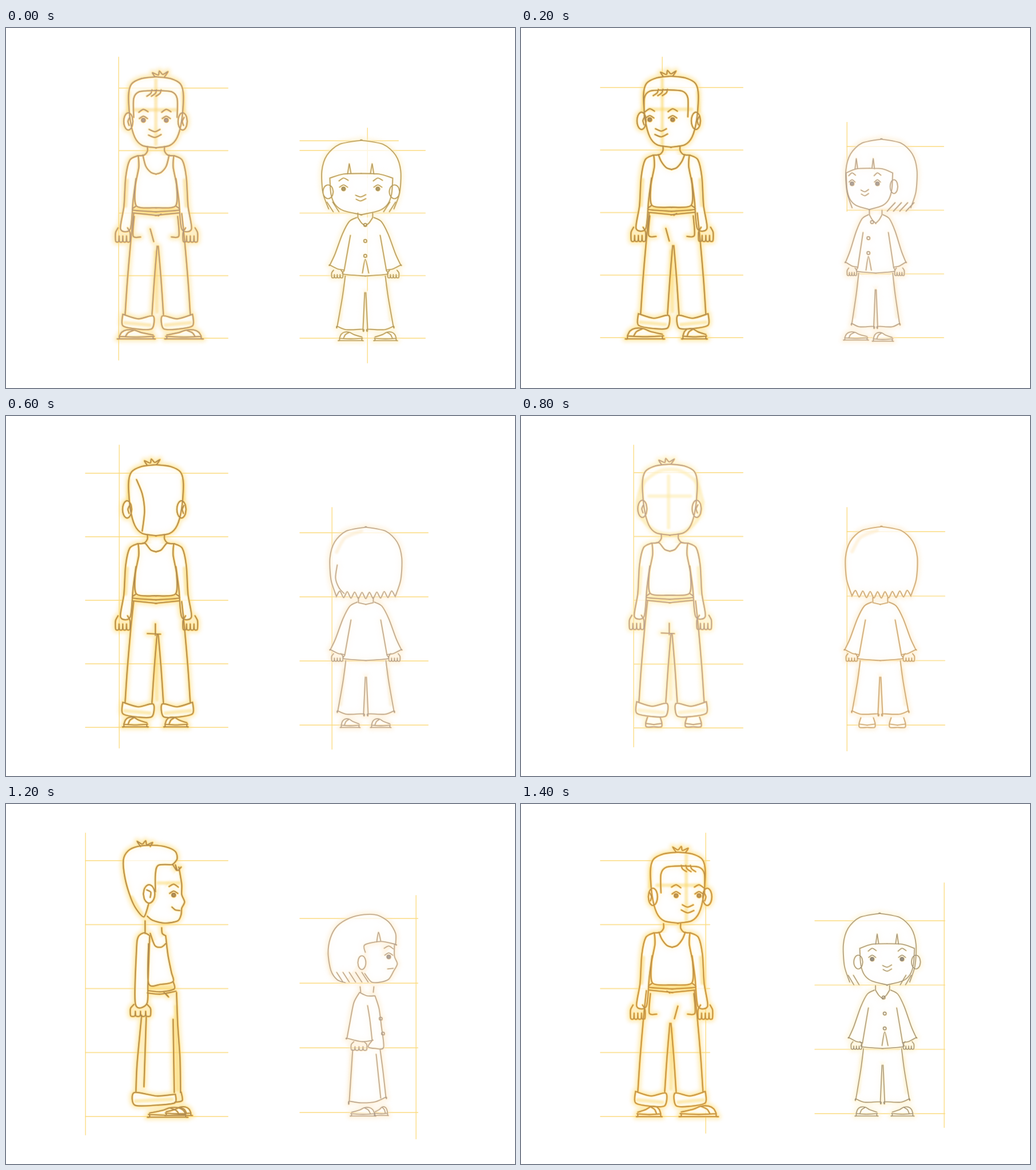
These frames come from a looping animation (890x629 px, 1.6 s). An HTML page with a canvas:

```html
<!DOCTYPE html>
<html lang="en">
<head>
<meta charset="utf-8">
<title>Character turnaround</title>
<style>
html, body { margin: 0; width: 100%; height: 100%; overflow: hidden; background: #fff; }
canvas { display: block; }
</style>
</head>
<body>
<canvas id="stage" width="890" height="629"></canvas>
<script>
const ctx = document.getElementById('stage').getContext('2d');
const STEP = 200;

let strokes = [];
let map = (x, y) => [x, y];

// Draw in a moved and scaled space; sx = -1 mirrors
function at(x, y, sx, sy, draw) {
  const outer = map;
  map = (u, v) => outer(x + u * sx, y + v * sy);
  draw();
  map = outer;
}

const points = text => text.split(' ').map(p => p.split(',').map(Number));
const mirror = pts => pts.map(([x, y]) => [-x, y]);

// Smooth path through the points; a doubled point makes a corner
function curve(p) {
  const path = new Path2D();
  path.moveTo(...p[0]);
  for (let i = 0; i < p.length - 1; i++) {
    const a = p[i - 1] || p[i], b = p[i], c = p[i + 1], d = p[i + 2] || c;
    path.bezierCurveTo(b[0] + (c[0] - a[0]) / 7, b[1] + (c[1] - a[1]) / 7,
      c[0] - (d[0] - b[0]) / 7, c[1] - (d[1] - b[1]) / 7, ...c);
  }
  return path;
}

function pen(pts, kind = 'line') {
  if (typeof pts === 'string') pts = points(pts);
  strokes.push({ kind, path: curve(pts.map(p => map(...p))) });
}
const shape = text => pen(text, 'shape');
const tone = text => pen(text, 'tone');

// One stroke continued by its mirror image
function sym(text, kind) {
  const p = points(text);
  pen([...p, ...mirror(p).reverse()], kind);
}
// A stroke and its separate mirror image
function pair(text, kind) {
  const p = points(text);
  pen(p, kind);
  pen(mirror(p), kind);
}

function oval(x, y, rx, ry) {
  const pts = [];
  for (let a = 0; a < 6.6; a += Math.PI / 5) pts.push([x + rx * Math.cos(a), y + ry * Math.sin(a)]);
  pen(pts, 'shape');
}

function dot(x, y, r, kind) {
  const path = new Path2D();
  path.arc(...map(x, y), r, 0, 7);
  strokes.push({ kind, path });
}
const button = (x, y) => dot(x, y, 2.6, 'line');

function eye(x, y) {
  dot(x, y, 3.2, 'dot');
  pen([[x - 7, y - 3], [x, y - 7], [x + 7, y - 3]]);
  pen([[x - 8, y - 14], [x, y - 19], [x + 8, y - 15]]);
}

function fist(x, y, w, h) {
  at(x, y, w, h, () => {
    pair('-.32,0 -.48,.3 -.5,.6');
    for (let u = -.5; u < .5; u += .25)
      pen([[u, .55], [u + .03, .92], [u + .22, .92], [u + .25, .55]]);
  });
}

function sandal(toe, heel, y, h) {
  at(toe, y - h, heel - toe, h, () => {
    shape('0,.72 .07,.32 .22,.08 .45,.1 .65,.35 1,.6');
    shape('0,.75 0,1 0,1 1,1 1,1 1,.75 1,.75 .5,.82 0,.75');
    pen('.18,.75 .26,.36 .44,.1');
  });
}

function heels(near, far, y) {
  for (const x of [near, far]) at(x, y, 1, 1, () => {
    sym('-11,-17 -14,-7 -13,0 0,0', 'shape');
    sym('-14,-6 0,-4');
  });
}

// Frame lines: one upright, the rest evenly spaced from y0 to y1
function rule(x, top, end, left, right, y0, y1, rows) {
  pen([[x, top], [x, end]], 'guide');
  for (let i = 0; i <= rows; i++) {
    const y = y0 + (y1 - y0) * i / rows;
    pen([[left, y], [right, y]], 'guide');
  }
}
const manRule = (x, end, left, y0, y1) => rule(x, 51, end, left, 388, y0, y1, 4);

// ---- man ----
const tuft = () => pen('-12,84 -16,77 -6,81 -4,74 2,80 11,75 5,84');

function manSkull(turn, quiff) {
  sym('0,84 -25,87 -43,97 -48,118 -45,160 -37,190 -24,204 0,208', 'shape');
  for (const side of [-48, 47]) {
    oval(side + turn * .2, 162, 8, 15);
    pen([[side + 2, 155], [side - 1, 162], [side + 1, 169]]);
  }
  at(quiff, 0, 1, 1, tuft);
  pair('-47,112 -49,145', 'tone');
}

function manHead(turn, quiff) {
  manSkull(turn, quiff);
  at(turn / 2, 0, 1, 1, () => sym('-38,155 -38,122 -28,110 0,108'));
  at(turn, 0, 1, 1, () => {
    eye(-20, 160);
    eye(20, 160);
    pen('-10,176 0,180 9,176');
    pen('-11,186 0,190 11,185');
    for (const x of [-14, -6, 2]) pen([[x, 118], [x + 7, 113], [x + 9, 107]]);
    tone('2,90 2,202');
  });
  tone('-38,142 36,142');
}

function manSideHead() {
  shape('-36,112 -41,142 -41,160 -46,173 -41,184 -40,195 -34,206 -12,210 10,205 19,198');
  shape('-25,108 -33,98 -30,85 -14,77 8,74 36,76 53,84 61,100 58,132 48,166 38,186 25,199 17,177');
  pen('-25,108 0,109 5,125 5,155');
  pen('-40,112 -34,118 -30,108 -32,118 -25,107');
  oval(16, 159, 10, 16);
  pen('14,165 13,156 20,152');
  eye(-27, 161);
  pen('-38,188 -30,187 -24,182');
  at(26, -8, 1, 1, tuft);
  tone('-37,140 0,140');
  tone('46,165 28,195');
}

function manBody(collar, back) {
  pair('-15,206 -15,214 -21,221 -31,222');
  sym('-31,222 -30,242 -36,275 -34,310 0,313', 'shape');
  sym(`-23,221 -18,${collar - 14} -9,${collar - 3} 0,${collar}`);
  pair('-32,222 -46,230 -53,260 -56,310 -62,350 -45,350 -40,300 -35,262', 'shape');
  sym('-35,310 -40,317 0,320');
  sym('-40,322 0,326');
  fist(-58, 348, 26, 26);
  fist(60, 348, 26, 26);
  at(3, 0, 1, 1, () => {
    pair('-42,323 -47,370 -53,440 -57,500');
    pair('-1,380 -6,440 -10,500');
    pair('-61,499 -61,519 -34,525 -10,524 -8,502 -34,507 -61,499', 'shape');
    pair('-57,514 -14,518', 'tone');
  });
  if (back) {
    pen('-15,379 8,380');
    pen('-1,362 -1,382');
  } else {
    pen('-10,350 -4,372');
    pair('-38,328 -40,362 -27,364');
    pen('4,327 9,324');
  }
  pair('-50,265 -53,310', 'tone');
  tone('0,390 2,495');
  sym('-33,316 0,319', 'tone');
}

function manSideBody() {
  pen('-9,212 -10,222 -16,226');
  pen('20,200 20,222');
  shape('-16,226 -20,260 -26,290 -29,306 -7,311 14,309 14,240');
  pen('-16,240 -8,246 3,243 11,222');
  shape('13,225 22,221 32,228 35,250 37,345 17,345 15,310 12,226');
  pen('-29,306 -31,319 -8,324 14,322');
  pen('-34,323 -7,328 16,326');
  pen('-16,327 -21,333 -13,325');
  pen('-35,325 -37,380 -41,440 -42,500');
  pen('-29,372 -31,500');
  pen('26,365 34,450 36,498');
  pen('18,368 22,490');
  pen('-43,499 -45,514 -32,517');
  shape('-33,503 -32,518 0,522 38,522 39,500 0,506 -33,503');
  fist(28, 346, 36, 22);
  sandal(-60, -17, 540, 16);
  sandal(-51, 12, 543, 18);
  tone('-34,350 -37,495');
  tone('-27,512 36,515');
  tone('-26,316 12,317');
}

// ---- girl ----
const bob = () => sym('-57,316 -67,288 -69,250 -60,222 -38,203 0,196', 'shape');

function kidFace(turn, bothEars) {
  sym('-55,262 -53,290 -46,308 -31,319 0,326', 'shape');
  sym('-55,262 -31,255 0,254');
  oval(58, 286, 9, 12);
  if (bothEars) oval(-58, 286, 9, 12);
  at(turn, 0, 1, 1, () => {
    eye(-30, 281);
    eye(30, 281);
    pen('-9,292 0,295 9,291');
    pen('-8,299 0,302 9,298');
    pair('-20,237 -23,255');
    pair('-20,237 -17,254');
  });
}

function kidFront() {
  bob();
  for (const x of [-49, -39]) pair(`${x - 11},304 ${x},321`);
}

function kidBackHead() {
  bob();
  const tips = [];
  for (let i = 0; i <= 16; i++) tips.push([-57 + i * 7.1, (i % 2 ? 307 : 318) + 3 * Math.sin(i / 5)]);
  pen(tips);
  tone('-56,240 -40,215 -8,203');
}

function kidSideHead() {
  shape('38,321 52,316 63,300 68,270 64,243 52,222 30,208 5,202 -18,203 -38,215 -50,235 -50,254 -50,254 -24,249 4,255 3,268');
  shape('-48,254 -48,275 -53,288 -47,300 -38,315 -24,320 -8,320 4,305');
  pen('-24,248 -20,233 -17,250');
  oval(9, 286, 7, 12);
  eye(-38, 276);
  pen('-46,296 -36,297');
  for (let x = -2; x < 44; x += 11) pen([[x + 11, 303], [x, 320]]);
  tone('68,270 62,305');
}

function kidBody(turn, back) {
  pair('-13,323 -13,331');
  sym('-15,331 -28,338 -40,360 -53,395 -62,414 -62,414 -48,421 -37,423 -38,430 0,433', 'shape');
  pair('-26,362 -31,390 -37,424');
  pair('-35,433 -40,470 -49,521 -49,521 -33,527 -4,526 -4,526 -1,462', 'shape');
  pair('-38,450 -44,510', 'tone');
  if (back) return sym('-13,332 0,335');
  sym('-13,331 -7,340 0,346');
  at(turn, 0, 1, 1, () => {
    button(-turn / 2, 344);
    button(0, 372);
    button(0, 398);
    pen('-5,428 0,404 6,428');
  });
}

function kidHands(gap, y) {
  fist(-gap, y, 20, 14);
  fist(gap, y, 20, 14);
}

function kidSideBody() {
  pair('-12,322 -11,332');
  shape('-14,338 -21,360 -25,390 -29,428 -15,430 -2,427 -9,416 -9,416 10,418 35,412 35,412 30,385 23,350 13,332');
  pen('-14,338 0,338 13,332');
  pen('-1,355 -5,380 -9,416');
  button(-24, 378);
  button(-28, 404);
  shape('-23,432 -28,470 -33,515 -33,515 -15,523 10,525 31,522 31,522 25,432');
  pen('-16,440 -24,517');
  fist(14, 418, 28, 16);
  tone('26,440 30,518');
}

// ---- colours: ink, under-drawing, glow, line width ----
const look = (ink, under, glow, width) => ({ ink, under, glow, width });
const amber = look('#a99284', '#eeb04c', '#fbd673', 1.5);
const gold = look('#a5834f', '#f0b544', '#fcd767', 1.7);
const pale = look('#b49d93', '#f2c577', '#fde7a0', 1.6);
const olive = look('#a08a55', '#e6c578', '#fdebbd', 1.2);
const tan = look('#a2958c', '#e8c699', '#fce8c4', 1.1);
const grey = look('#857c70', '#e9cf95', '#fdeec4', 1.1);

// ---- the eight views ----
function front() {
  figure(amber, () => {
    manRule(197, 580, 198, 105, 542);
    at(262, 1, 1, 1, () => {
      manHead(-2, 10);
      manBody(254);
      sandal(-64, -5, 542, 17);
      sandal(79, 19, 542, 17);
    });
  });
  figure(olive, () => {
    rule(632, 175, 585, 514, 733, 214, 542, 3);
    pen('514,197 686,197', 'guide');
    at(621, 0, 1, 1, () => {
      kidFront();
      kidFace(-1, true);
    });
    at(628, 0, 1, 1, () => {
      kidBody(0);
      kidHands(49, 423);
      sandal(-45, -6, 546, 16);
      sandal(54, 17, 546, 16);
    });
  });
}

function manQuarter(headX, bodyX, dy, side) {
  at(headX, 0, side, 1, () => manHead(-17, -2));
  at(bodyX, dy, side, 1, () => {
    manBody(247);
    sandal(-77, -16, 543, 20);
    sandal(20, 60, 543, 19);
  });
}

function quarterLeft() {
  figure(gold, () => {
    manRule(247, 205, 139, 104, 541);
    manQuarter(262, 263, 0, 1);
  });
  figure(tan, () => {
    rule(570, 165, 320, 570, 739, 207, 541, 3);
    at(630, -2, .9, 1, bob);
    for (let x = 640; x < 676; x += 11) pen([[x + 14, 305], [x, 320]]);
    at(609, -9, .74, 1, () => kidFace(-11));
    at(620, -5, .85, 1, () => {
      kidBody(-15);
      kidHands(49, 424);
    });
    sandal(566, 605, 545, 15);
    sandal(616, 649, 547, 16);
  });
}

function left() {
  figure(gold, () => {
    manRule(139, 550, 139, 102, 541);
    at(262, 0, 1, 1, () => { manSideHead(); manSideBody(); });
  });
  figure(tan, () => {
    rule(626, 180, 203, 514, 736, 211, 541, 3);
    at(630, 0, 1, 1, () => {
      kidSideHead();
      kidSideBody();
      sandal(-41, 12, 546, 18);
    });
  });
}

function backQuarter(side) {
  figure(gold, () => {
    manRule(262 - 64 * side, 580, 139, 100, 544);
    at(262, 1, side, 1, () => {
      manSkull(-12, -4);
      pen('-34,110 -24,135 -20,165 -24,200');
      manBody(236, true);
      sandal(-56, -16, 542, 18);
      sandal(16, 54, 542, 18);
    });
  });
  figure(tan, () => {
    rule(643 - 73 * side, 160, 582, 514, 738, 204, 540, 3);
    at(629, -2, side, 1, () => {
      at(0, 0, .91, 1, kidBackHead);
      pen('-50,262 -53,285 -47,302 -38,312');
      at(0, -4, 1, 1, () => { kidBody(0, true); kidHands(50, 421); });
      sandal(-43, -12, 546, 16);
      sandal(10, 42, 546, 16);
    });
  });
}

function back() {
  figure(pale, () => {
    manRule(197, 578, 198, 99, 545);
    oval(261, 150, 57, 57);
    strokes[strokes.length - 1].kind = 'tone';
    at(260, 0, 1, 1, () => {
      manSkull(0, -3);
      tone('-2,105 -2,195');
      tone('-36,140 36,140');
    });
    at(260, 0, 1, 1, () => manBody(236, true));
    heels(232, 301, 543);
  });
  figure(look('#b9976f', '#efc98e', '#fde8c0', 1.2), () => {
    rule(570, 160, 585, 570, 741, 202, 540, 3);
    at(630, -3, .91, 1, kidBackHead);
    at(628, -6, 1, 1, () => { kidBody(0, true); kidHands(50, 421); });
    heels(605, 658, 544);
  });
}

function right() {
  figure(gold, () => {
    manRule(139, 578, 139, 99, 546);
    at(266, -2, -1, 1, manSideHead);
    at(263, 4, -1, 1, manSideBody);
  });
  figure(tan, () => {
    rule(717, 160, 585, 514, 720, 200, 539, 3);
    at(631, -9, -1, 1, kidSideHead);
    at(631, -3, -1, 1, kidSideBody);
    sandal(667, 645, 544, 16);
    sandal(644, 604, 545, 16);
  });
}

function quarterRight() {
  figure(look('#b68b48', '#f0ac3c', '#fcd767', 1.6), () => {
    rule(323, 51, 575, 139, 330, 99, 546, 4);
    manQuarter(274, 264, 3, -1);
  });
  figure(grey, () => {
    rule(740, 138, 565, 514, 741, 204, 541, 3);
    at(627, -5, .92, 1, kidFront);
    at(640, -10, .87, 1, () => kidFace(0, true));
    at(632, -6, .95, 1, () => { kidBody(4); kidHands(48, 421); });
    sandal(586, 622, 545, 17);
    sandal(685, 649, 545, 17);
  });
}

const views = [front, quarterLeft, left, () => backQuarter(1), back, () => backQuarter(-1), right, quarterRight];

// ---- pencil ----
function trace(path, color, width, alpha) {
  ctx.strokeStyle = color;
  ctx.lineWidth = width;
  ctx.globalAlpha = alpha;
  ctx.stroke(path);
}

function figure({ ink, under, glow, width }, build) {
  strokes = [];
  build();
  const each = (kind, draw) => strokes.filter(s => s.kind === kind).forEach(s => draw(s.path));
  const lines = new Path2D();
  for (const kind of ['shape', 'line', 'dot']) each(kind, p => lines.addPath(p));

  each('guide', p => trace(p, '#fbdb80', 1.8, .75));
  ctx.filter = 'blur(3px)';
  trace(lines, glow, 11, .42);
  ctx.filter = 'none';
  ctx.globalAlpha = .72;
  ctx.fillStyle = '#fff';
  each('shape', p => ctx.fill(p));
  ctx.filter = 'blur(1.5px)';
  each('tone', p => trace(p, glow, 6, .5));
  ctx.filter = 'none';
  trace(lines, glow, width + 3, .4);
  ctx.save();
  ctx.translate(.6, .4);
  trace(lines, under, width + .7, .8);
  ctx.restore();
  trace(lines, ink, width, .85);
  ctx.fillStyle = ink;
  each('dot', p => ctx.fill(p));
  ctx.globalAlpha = 1;
}

let shown = -1;
function tick(now) {
  const k = Math.floor(now / STEP) % views.length;
  if (k !== shown) {
    shown = k;
    ctx.fillStyle = '#fff';
    ctx.fillRect(0, 0, 890, 629);
    views[k]();
  }
  requestAnimationFrame(tick);
}
ctx.lineCap = ctx.lineJoin = 'round';
tick(performance.now());
</script>
</body>
</html>
```
